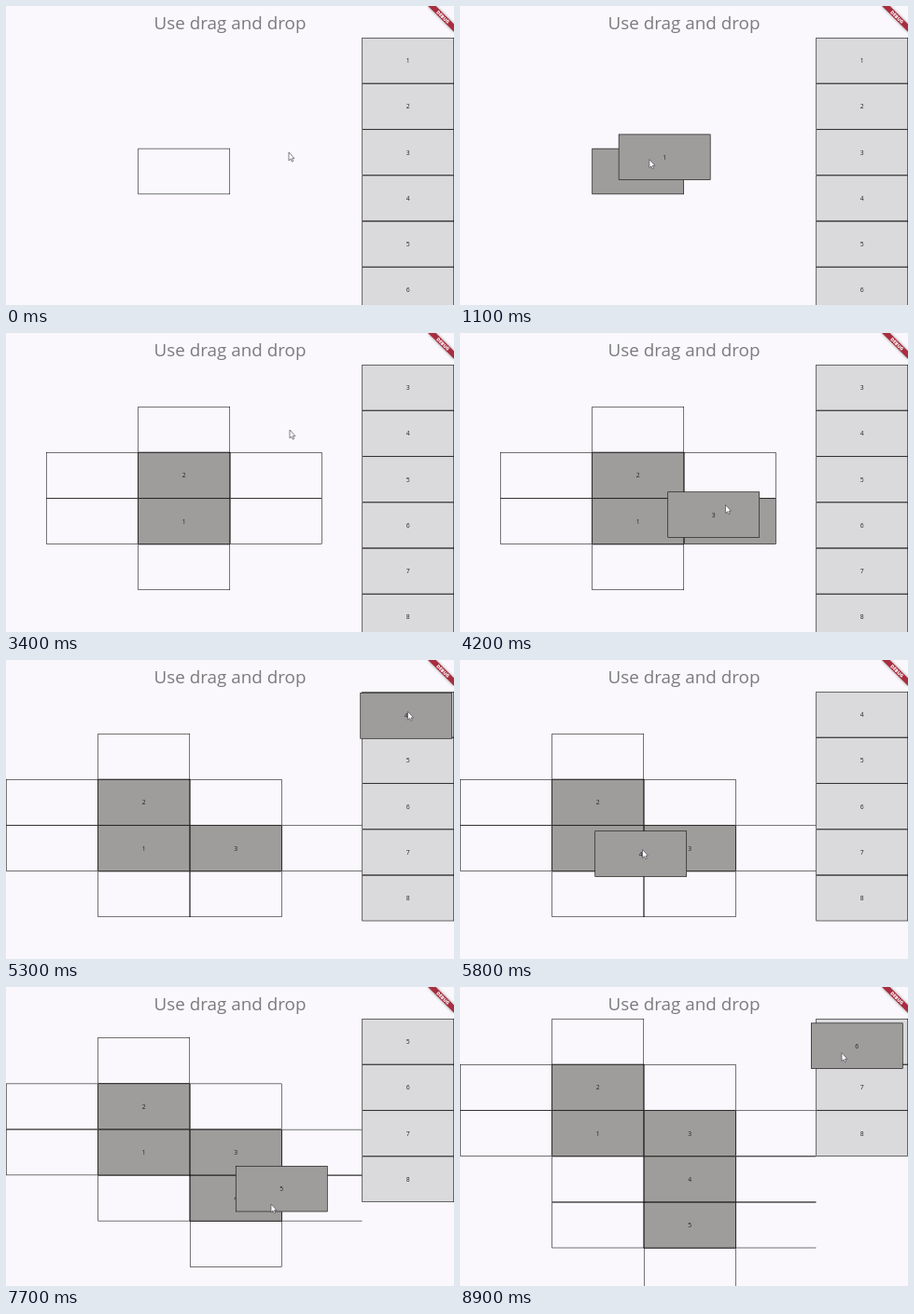
Recreate the animation shown at these times as an HTML page. Size 480 px wide and 321 px high, loop 9000 ms.

```html
<!DOCTYPE html>
<html lang="en">
<head>
<meta charset="utf-8">
<title>Drag and drop</title>
<style>
  html, body { margin: 0; width: 100%; height: 100%; overflow: hidden; background: #faf8fc; }
  svg { display: block; }
  text { font-family: "Open Sans", "Noto Sans", sans-serif; text-anchor: middle; }
  .title { font-size: 18.85px; fill: #7b7a7d; }
  .num { font-size: 6.8px; fill: #242424; }
  .edge { fill: none; stroke: #000; stroke-width: .55; }
  .ribbon { fill: #a82d3f; }
  .tag { font-size: 5px; font-weight: 800; fill: #fff; }
</style>
</head>
<body>
<svg width="480" height="321" viewBox="0 0 480 321">
  <defs>
    <clipPath id="board"><rect y="33" width="381.5" height="288"/></clipPath>
    <filter id="soft" x="-50%" y="-150%" width="200%" height="400%"><feGaussianBlur stdDeviation="1.5"/></filter>
  </defs>
  <rect width="480" height="321" fill="#faf8fc"/>
  <text class="title" x="240" y="24.6">Use drag and drop</text>
  <g id="grid" clip-path="url(#board)"></g>
  <g id="list"></g>
  <g id="held"></g>
  <g transform="translate(480 0) rotate(45)">
    <rect x="-19.7" y="13.8" width="39.4" height="5.9" opacity=".4" filter="url(#soft)"/>
    <rect class="ribbon" x="-19.7" y="13.8" width="39.4" height="5.9"/>
    <text class="tag" x="0" y="18.5">DEBUG</text>
  </g>
  <path id="cursor" d="M0 0V9L2 7.2L3.4 10.2L4.7 9.6L3.4 6.7H6Z" fill="#fff" stroke="#4a4a55" stroke-width=".7" stroke-linejoin="round"/>
</svg>
<script>
const LOOP = 9000, STEP = 100;
const W = 98.5, H = 49.25, TOP = 34, LIST_X = 381.5, COUNT = 8;
const MID_X = LIST_X / 2, MID_Y = (TOP + 321) / 2;
const DARK = '#9e9d9b', LIGHT = '#dad9dc';
const RETURN = 400, PAUSE = 200;

// grab: pointer inside the item; near: stop before the pick-up;
// via: point on the way at time mid; rest: where the item is let go.
const drags = [
  { pick: 250, mid: 500, drop: 1600, grab: [33, 27], near: [352, 231], via: [402, 66], rest: [178, 177], cell: [0, 0] },
  { pick: 2250, mid: 2500, drop: 3000, grab: [25, 20], near: [400, 98], via: [374, 71], rest: [181, 128], cell: [0, -1] },
  { pick: 3750, mid: 4200, drop: 4700, grab: [62, 14], near: [304, 104], via: [284.5, 184.5], rest: [283.5, 197], cell: [1, 0] },
  { pick: 5250, mid: 5800, drop: 6700, grab: [51, 20], via: [195.5, 203.5], rest: [221, 249], cell: [1, 1] },
  { pick: 7250, mid: 7700, drop: 8300, grab: [38, 41], via: [284, 233], rest: [238, 284], cell: [1, 2] },
  { pick: 8750, mid: 8900, drop: LOOP, grab: [33, 32], via: [409, 70.6], rest: [409, 70.6] }
];

const $ = id => document.getElementById(id);
const linear = k => k;
const easeIn = k => k * k;
const easeOut = k => 1 - (1 - k) ** 2;

const stops = [{ t: 0, at: [303, 157], ease: linear }];
const stop = (t, at, ease) => stops.push({ t, at, ease });
let free = -300;
for (const d of drags) {
  const origin = [LIST_X + d.grab[0], TOP + d.grab[1]];
  stop(free + RETURN, d.near || origin, easeOut);
  stop(d.pick, origin, linear);
  stop(d.mid, d.via, easeIn);
  stop(d.drop - PAUSE, d.rest, easeOut);
  stop(d.drop, d.rest, linear);
  free = d.drop;
}
stops.sort((a, b) => a.t - b.t);

function pointerAt(t) {
  const i = stops.findIndex(s => s.t > t);
  const a = stops[i - 1], b = stops[i];
  const k = b.ease((t - a.t) / (b.t - a.t));
  return a.at.map((v, n) => v + (b.at[n] - v) * k);
}

// All fills come first, so that shared edges add up.
function boxes(items) {
  let fills = '', edges = '', labels = '';
  for (const { x, y, fill, label } of items) {
    if (fill) fills += `<rect x="${x}" y="${y}" width="${W}" height="${H}" fill="${fill}"/>`;
    edges += `<rect class="edge" x="${x + .25}" y="${y + .25}" width="${W - .5}" height="${H - .5}"/>`;
    if (label) labels += `<text class="num" x="${x + W / 2}" y="${y + H / 2 + 2.6}">${label}</text>`;
  }
  return fills + edges + labels;
}

// Placed items plus an empty cell on each free side.
function gridCells(placed) {
  if (!placed.length) return [{ c: 0, r: 0 }];
  const cells = new Map();
  placed.forEach(([c, r], i) => cells.set(c + ',' + r, { c, r, label: i + 1 }));
  for (const [c, r] of placed)
    for (const [dc, dr] of [[1, 0], [-1, 0], [0, 1], [0, -1]]) {
      const key = (c + dc) + ',' + (r + dr);
      if (!cells.has(key)) cells.set(key, { c: c + dc, r: r + dr });
    }
  return [...cells.values()];
}

function layout(cells) {
  const cols = cells.map(k => k.c), rows = cells.map(k => k.r);
  const c0 = Math.min(...cols), r0 = Math.min(...rows);
  const w = (Math.max(...cols) - c0 + 1) * W, h = (Math.max(...rows) - r0 + 1) * H;
  const x0 = Math.max(0, MID_X - w / 2), y0 = Math.max(TOP, MID_Y - h / 2);
  for (const k of cells) {
    k.x = x0 + (k.c - c0) * W;
    k.y = y0 + (k.r - r0) * H;
  }
}

function draw(t) {
  const [px, py] = pointerAt(t);
  const done = drags.filter(d => t >= d.drop).length;
  const drag = drags[done];
  const holding = t >= drag.pick;

  const cells = gridCells(drags.slice(0, done).map(d => d.cell));
  layout(cells);
  for (const k of cells) {
    const over = holding && px < LIST_X && px >= k.x && px < k.x + W && py >= k.y && py < k.y + H;
    if (k.label || over) k.fill = DARK;
  }
  $('grid').innerHTML = boxes(cells);

  const list = [];
  for (let i = done; i < COUNT; i++)
    list.push({ x: LIST_X, y: TOP + (i - done) * H, fill: LIGHT, label: i + 1 });
  $('list').innerHTML = boxes(list);

  const [gx, gy] = drag.grab;
  $('held').innerHTML = holding
    ? boxes([{ x: px - gx, y: py - gy, fill: DARK, label: done + 1 }]) : '';
  $('cursor').setAttribute('transform', `translate(${px} ${py})`);
}

const start = performance.now();
let shown = -1;
function tick() {
  const t = Math.floor((performance.now() - start) % LOOP / STEP) * STEP;
  if (t !== shown) draw(shown = t);
  requestAnimationFrame(tick);
}
tick();
</script>
</body>
</html>
```
